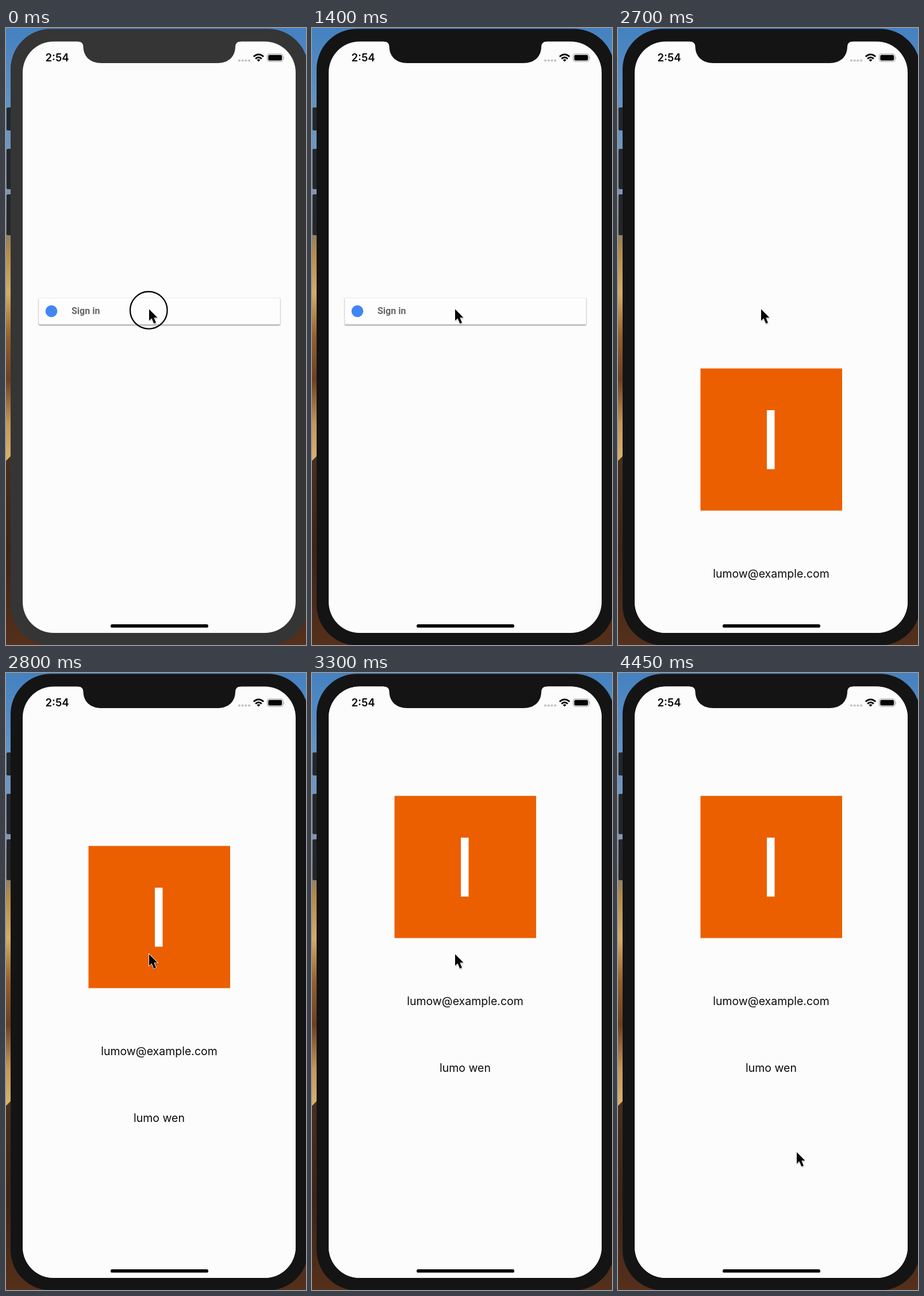
Write an HTML page that moves like this. It is 522 px wide and 1072 px high and loops after 4.5 s.

```html
<!DOCTYPE html>
<html lang="en">
<head>
<meta charset="utf-8">
<title>Sign in</title>
<style>
  html, body { margin: 0; width: 100%; height: 100%; overflow: hidden; background: #4a2a18; }
  svg { display: block; width: 522px; height: 1072px; }
  .label { font: 400 19.5px Inter, sans-serif; text-anchor: middle; fill: #0b0b0b; }
  .clock { font: 600 18.5px Inter, sans-serif; fill: #050505; }
  .button { font: 700 16px Roboto, sans-serif; fill: #666; }
</style>
</head>
<body>
<svg viewBox="0 0 522 1072">
  <defs>
    <linearGradient id="wall" x1="0" y1="0" x2="0" y2="1">
      <stop offset="0" stop-color="#4481c0"/>
      <stop offset=".13" stop-color="#6394c6"/>
      <stop offset=".28" stop-color="#8494b4"/>
      <stop offset=".335" stop-color="#8f8068"/>
      <stop offset=".36" stop-color="#b08a4c"/>
      <stop offset=".43" stop-color="#d3ad66"/>
      <stop offset=".5" stop-color="#94602f"/>
      <stop offset=".57" stop-color="#6d4022"/>
      <stop offset=".64" stop-color="#c3965a"/>
      <stop offset=".7" stop-color="#d9b26b"/>
    </linearGradient>
    <linearGradient id="ground" x1="0" y1="0" x2="0" y2="1">
      <stop offset="0" stop-color="#46301f"/>
      <stop offset=".5" stop-color="#3c2418"/>
      <stop offset="1" stop-color="#55301b"/>
    </linearGradient>
    <clipPath id="screen"><rect x="29" y="23.5" width="475" height="1027.5" rx="54"/></clipPath>
    <filter id="soft" x="-20%" y="-20%" width="140%" height="140%"><feGaussianBlur stdDeviation="1"/></filter>
    <filter id="edge" x="-20%" y="-5%" width="140%" height="110%"><feGaussianBlur stdDeviation=".6"/></filter>
  </defs>

  <rect width="522" height="1072" fill="url(#wall)"/>
  <path d="M0 752L8 744L522 744V1072H0Z" fill="url(#ground)"/>
  <g fill="#23272a">
    <rect x="1" y="138" width="10" height="40" rx="2"/>
    <rect x="1" y="210" width="10" height="70" rx="2"/>
    <rect x="1" y="289" width="10" height="71" rx="2"/>
  </g>
  <g id="bezel">
    <rect x="8" y="1.5" width="518" height="1071" rx="70"/>
  </g>

  <g clip-path="url(#screen)">
    <rect x="29" y="23" width="475" height="1029" fill="#fcfcfc"/>
    <rect x="57" y="470" width="420" height="46.5" rx="2" fill="#000" opacity=".5" filter="url(#soft)"/>
    <rect x="57" y="469" width="420" height="46" rx="2" fill="#fdfdfd" stroke="#e6e6e6" stroke-width=".7"/>
    <circle cx="79" cy="492" r="10.3" fill="#4285f4"/>
    <text class="button" x="114" y="497.3">Sign in</text>

    <g id="sheet">
      <rect x="29" y="23" width="475" height="1029" fill="#fcfcfc"/>
      <rect x="143.5" y="213.5" width="246.5" height="247" fill="#eb5f00"/>
      <rect x="259" y="286" width="13.5" height="102.5" fill="#fff" filter="url(#edge)"/>
      <text class="label" x="266.5" y="577">lumow@example.com</text>
      <text class="label" x="266.5" y="693">lumo wen</text>
    </g>

    <text class="clock" x="68.5" y="58.3">2:54</text>
    <g fill="#c2c2c2">
      <circle cx="406" cy="56.5" r="2.1"/><circle cx="411.7" cy="56.5" r="2.1"/>
      <circle cx="417.4" cy="56.5" r="2.1"/><circle cx="423.1" cy="56.5" r="2.1"/>
    </g>
    <g fill="none" stroke="#050505" stroke-width="2.7">
      <path d="M430.8 49.8Q439.5 41.8 448.2 49.8"/>
      <path d="M434.1 53.4Q439.5 48.6 444.9 53.4"/>
      <path d="M436.5 55.4Q439.5 53 442.5 55.4L439.5 58.6Z" fill="#050505" stroke="none"/>
    </g>
    <rect x="454.5" y="45" width="27.5" height="13.2" rx="3.8" fill="none" stroke="#9b9b9b" stroke-width="1.1"/>
    <rect x="456.3" y="46.8" width="23.9" height="9.6" rx="2.2" fill="#050505"/>
    <path d="M483.2 49.4Q485 51.6 483.2 53.8Z" fill="#9b9b9b"/>
    <rect x="182" y="1036" width="170" height="5.8" rx="2.9" fill="#050505"/>
  </g>

  <path id="notch" d="M125 22V23.5Q134.5 23.5 134.5 33C135 50 147 61 166 61H368C387 61 398.5 50 399 33Q399 23.5 408.500 23.5V22Z"/>
  <circle id="ring" cx="248.300" cy="490.300" r="32.300" fill="none" stroke="#050505" stroke-width="2.3"/>
  <g id="cursor">
    <path d="M0 0V20L4.500 16L8.300 25L12 23.400L8.300 14.800H14.500Z" transform="translate(.5 1.6)" opacity=".35" filter="url(#soft)"/>
    <path d="M0 0V20L4.500 16L8.300 25L12 23.400L8.300 14.800H14.500Z" fill="#050505" stroke="#fff" stroke-width="1.6" paint-order="stroke"/>
  </g>
</svg>
<script>
  const LOOP = 4500, STEP = 50;
  const PRESS_END = 100, DIM_AT = 50;
  const SHEET = { start: 2590, rate: 0.0195, travel: 1028 };
  const MOVE = { start: 3550, end: 4150, from: [249, 488.5], to: [311, 832.5] };

  const el = id => document.getElementById(id);
  const [bezel, notch, ring, sheet, cursor] = ['bezel', 'notch', 'ring', 'sheet', 'cursor'].map(el);
  const place = (node, x, y) => node.setAttribute('transform', `translate(${x} ${y})`);

  // Critically damped spring, from full travel to rest.
  function sheetOffset(t) {
    const u = Math.max(0, t - SHEET.start) * SHEET.rate;
    return SHEET.travel * (1 + u) * Math.exp(-u);
  }

  function cursorAt(t) {
    const p = Math.min(1, Math.max(0, (t - MOVE.start) / (MOVE.end - MOVE.start)));
    const e = p * p * (3 - 2 * p);
    return MOVE.from.map((a, i) => a + (MOVE.to[i] - a) * e);
  }

  function draw(t) {
    const shade = t < DIM_AT ? '#353535' : '#141414';
    bezel.setAttribute('fill', shade);
    notch.setAttribute('fill', shade);
    ring.style.display = t < PRESS_END ? '' : 'none';
    sheet.style.display = t < SHEET.start ? 'none' : '';
    place(sheet, 0, Math.round(sheetOffset(t)));
    place(cursor, ...cursorAt(t));
  }

  const origin = performance.now();
  function tick(now) {
    const t = Math.max(0, now - origin) % LOOP;
    draw(Math.floor(t / STEP) * STEP);
    requestAnimationFrame(tick);
  }
  draw(0);
  requestAnimationFrame(tick);
</script>
</body>
</html>
```
